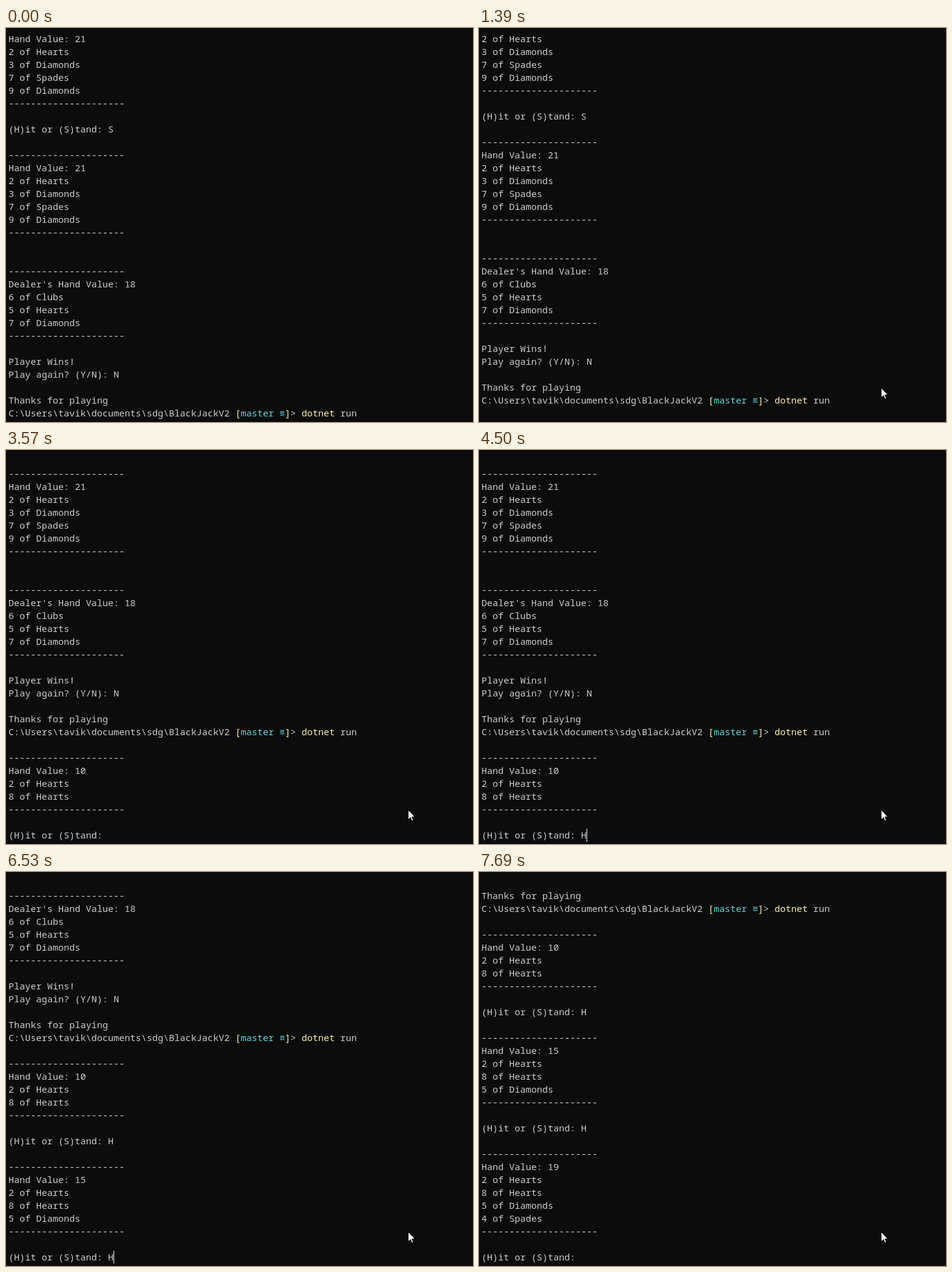
Animation, 760 px wide and 641 px high, one loop 8000 ms. Source, as an HTML page with a canvas:

```html
<!DOCTYPE html>
<html lang="en">
<head>
<meta charset="utf-8">
<title>Blackjack in the terminal</title>
<style>
  html, body { margin: 0; width: 100%; height: 100%; overflow: hidden; background: #0c0c0c; }
  canvas { display: block; }
</style>
</head>
<body>
<canvas id="stage" width="760" height="641"></canvas>
<script>
const ctx = document.getElementById('stage').getContext('2d');
const LOOP = 8000, LEFT = 4, TOP = 7, CELL = 9, ROW = 21, ROWS = 30, BASE = 16;
const GREY = '#cccccc', YELLOW = '#f9f1a5', CYAN = '#61d6d6';
const FIRST_BLINK = 610, BLINK = 550;
const RULE = '-'.repeat(21);
const ASK = '(H)it or (S)tand: ';

// A boxed list of cards under the sum of their ranks.
function hand(cards, owner = '') {
  const value = cards.reduce((sum, card) => sum + parseInt(card), 0);
  return [RULE, `${owner}Hand Value: ${value}`, ...cards, RULE];
}

const winner = hand(['2 of Hearts', '3 of Diamonds', '7 of Spades', '9 of Diamonds']);
const dealer = hand(['6 of Clubs', '5 of Hearts', '7 of Diamonds'], "Dealer's ");
const drawn = ['2 of Hearts', '8 of Hearts', '5 of Diamonds', '4 of Spades'];
const turn = count => [...hand(drawn.slice(0, count)), '', ASK];

const prompt = [
  ['C:\\Users\\tavik\\documents\\sdg\\BlackJackV2 ', GREY],
  ['[', YELLOW], ['master ≡', CYAN], [']', YELLOW],
  ['> ', GREY], ['dotnet', YELLOW], [' run', GREY]
];

const history = [
  ...winner.slice(1), '', ASK + 'S', '', ...winner, '', '', ...dealer, '',
  'Player Wins!', 'Play again? (Y/N): N', '', 'Thanks for playing', prompt
];

// Output and keystrokes; "key" marks those that restart the caret blink.
const events = [
  { at: 760, print: [''], key: true },
  { at: 1770, print: turn(2) },
  { at: 4500, type: 'H', key: true },
  { at: 5050, print: ['', ...turn(3)], key: true },
  { at: 6530, type: 'H', key: true },
  { at: 7080, print: ['', ...turn(4)], key: true }
];

const partsOf = line => Array.isArray(line) ? line : [[line, GREY]];

function session(t) {
  const lines = [...history];
  let keyTime = 380 - FIRST_BLINK - BLINK;
  for (const e of events) {
    if (e.at > t) break;
    if (e.print) lines.push(...e.print);
    if (e.type) lines[lines.length - 1] += e.type;
    if (e.key) keyTime = e.at;
  }
  const phase = Math.floor((t - keyTime - FIRST_BLINK) / BLINK);
  return { rows: lines.slice(-ROWS), lit: phase < 0 || phase % 2 === 1 };
}

// Draws one row and returns the x where it ends.
function drawLine(line, row) {
  let x = LEFT;
  for (const [text, color] of partsOf(line)) {
    ctx.fillStyle = color;
    ctx.fillText(text, x, TOP + row * ROW + BASE);
    x += text.length * CELL;
  }
  return x;
}

const arrow = new Path2D('M0 0V16L3.7 12.4 6 18 8.4 17 6.1 11.5H11Z');

// The pointer glides in by three steps, then jolts up and settles.
function drawPointer(t) {
  if (t < 70) return;
  const k = Math.min(2, Math.floor((t - 70) / 80)) / 2;
  const x = 669 - 15 * k;
  const y = t < 380 ? 608 - 21 * k : t < 480 ? 573 : 585;
  ctx.save();
  ctx.translate(x + 0.5, y + 0.5);
  ctx.fillStyle = '#fff';
  ctx.strokeStyle = '#000';
  ctx.fill(arrow);
  ctx.stroke(arrow);
  ctx.restore();
}

function draw(t) {
  ctx.fillStyle = '#0c0c0c';
  ctx.fillRect(0, 0, 760, 641);
  ctx.font = '500 15px "Noto Sans Mono", "DejaVu Sans Mono", monospace';

  const { rows, lit } = session(t);
  let end = LEFT;
  rows.forEach((line, row) => { end = drawLine(line, row); });
  if (lit) {
    ctx.fillStyle = '#fff';
    ctx.fillRect(end, TOP + (ROWS - 1) * ROW, 1, ROW);
  }
  drawPointer(t);
}

const start = performance.now();
function tick() {
  draw((performance.now() - start) % LOOP);
  requestAnimationFrame(tick);
}
tick();
</script>
</body>
</html>
```
